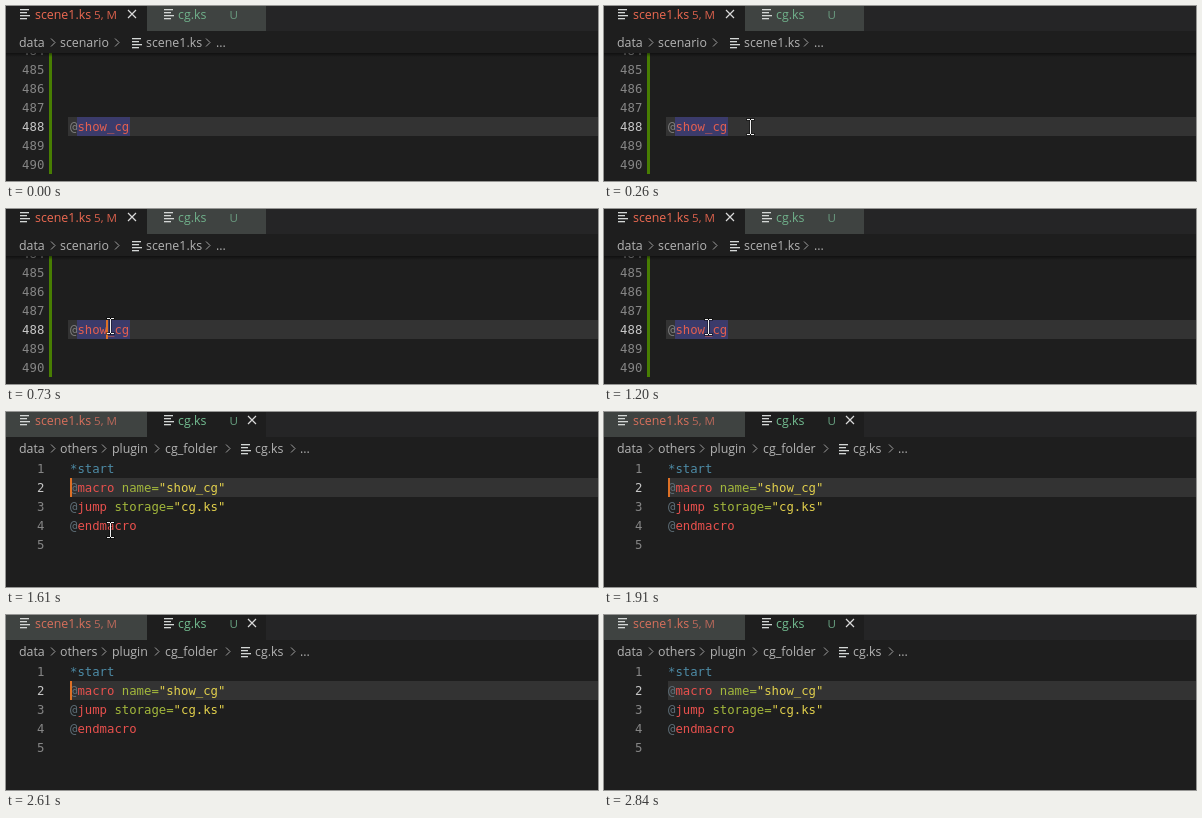
An HTML page with a canvas that plays this animation: 592x175 px, repeating every 2930 ms.

```html
<!DOCTYPE html>
<html lang="en">
<head>
<meta charset="utf-8">
<title>Jump to macro definition</title>
<style>
html, body { margin: 0; width: 100%; height: 100%; overflow: hidden; background: #1e1e1e; }
canvas { display: block; width: 592px; height: 175px; }
</style>
</head>
<body>
<canvas id="stage" width="592" height="175"></canvas>
<script>
const ctx = document.getElementById('stage').getContext('2d');
const LOOP = 2930, SWITCH = 1610;
const UI = '"Open Sans", "Noto Sans", sans-serif';
const CODE = '12.3px "DejaVu Sans Mono", monospace';
const CHAR = 7.4, ROW = 19, LEFT = 64;
const C = {
  bg: '#1e1e1e', bar: '#252526', tab: '#3f4341', line: '#333333', select: '#3b3b6b',
  num: '#858585', numOn: '#c6c6c6', crumb: '#b4b4b4', icon: '#d4d7d6', caret: '#dd7126',
  at: '#5f707a', red: '#e8504d', attr: '#a3b83c', str: '#e2d04c', label: '#4d8ba6'
};

// Pointer positions: time, x, y
const pointer = [
  [130, 236, 144], [195, 190, 132], [260, 146, 121], [330, 118, 114], [390, 106, 113],
  [530, 95, 113], [600, 104, 117], [1130, 104, 118]
];

function box(x, y, w, h, color) {
  ctx.fillStyle = color;
  ctx.fillRect(x, y, w, h);
}

function text(str, x, y, color, font, align = 'left') {
  ctx.font = font;
  ctx.fillStyle = color;
  ctx.textAlign = align;
  ctx.fillText(str, x, y);
}

function label(str, x, y, color, size = 12.4) {
  text(str, x, y, color, size + 'px ' + UI);
}

function strokes(points, color, width) {
  ctx.strokeStyle = color;
  ctx.lineWidth = width;
  ctx.beginPath();
  for (const [x1, y1, x2, y2] of points) {
    ctx.moveTo(x1, y1);
    ctx.lineTo(x2, y2);
  }
  ctx.stroke();
}

function fileIcon(x, y) {
  [9, 7, 10, 7].forEach((w, i) => box(x, y + i * 3, w, 1.3, C.icon));
}

function chevron(x) {
  strokes([[x - 2, 32.5, x + 2, 36.5], [x + 2, 36.5, x - 2, 40.5]], '#a0a0a0', 1);
}

function cross(x) {
  strokes([[x - 4, 4, x + 4, 12], [x + 4, 4, x - 4, 12]], '#dadada', 1.2);
}

function tabs(second) {
  box(0, 0, 592, 25, C.bar);
  box(0, 0, 141, 25, second ? C.tab : C.bg);
  box(141, 0, 119, 25, second ? C.bg : C.tab);
  fileIcon(14, 3);
  label('scene1.ks', 29, 13, second ? '#d8705c' : '#ee6a52');
  label('5, M', 88, 12.5, second ? '#b9685a' : '#d9604c', 11.6);
  fileIcon(158, 3);
  label('cg.ks', 172, 13, second ? '#73bd91' : '#70b18b');
  label('U', 223.5, 12.5, second ? '#69a382' : '#6b9c80', 11.6);
  cross(second ? 246 : 126);
}

function crumbs(parts, chevrons, iconX) {
  box(0, 25, 592, 22, C.bg);
  parts.forEach(([str, x]) => label(str, x, 41, C.crumb));
  chevrons.forEach(chevron);
  fileIcon(iconX, 32);
}

function number(n, y, on) {
  text(n, 38.3, y, on ? C.numOn : C.num, CODE, 'right');
}

function code(y, ...parts) {
  let x = LEFT;
  for (const [str, color] of parts) {
    text(str, x, y, color, CODE);
    x += str.length * CHAR;
  }
}

function scenario() {
  box(62, 111, 530, ROW, C.line);
  box(71, 111, 53, ROW, C.select);
  for (let i = 0; i < 7; i++) number(484 + i, 49 + i * ROW, i === 4);
  box(43, 47, 3, 121, '#487e02');
  code(125, ['@', '#808080'], ['show_cg', '#e35f50']);
  crumbs([['data', 13], ['scenario', 54], ['scene1.ks', 140], ['...', 210]], [47, 111, 202], 126);
  const shade = ctx.createLinearGradient(0, 47, 0, 51);
  shade.addColorStop(0, 'rgba(0,0,0,.45)');
  shade.addColorStop(1, 'rgba(0,0,0,0)');
  box(0, 47, 592, 4, shade);
}

function macro() {
  box(64, 66, 528, ROW, C.line);
  for (let i = 0; i < 5; i++) number(i + 1, 61 + i * ROW, i === 1);
  const at = ['@', C.at];
  code(61, ['*start', C.label]);
  code(80, at, ['macro ', C.red], ['name=', C.attr], ['"show_cg"', C.str]);
  code(99, at, ['jump ', C.red], ['storage=', C.attr], ['"cg.ks"', C.str]);
  code(118, at, ['endmacro', C.red]);
  crumbs([['data', 13], ['others', 54], ['plugin', 106], ['cg_folder', 159], ['cg.ks', 249], ['...', 294]],
    [47, 98, 151, 222, 287], 235);
}

function beam(x, y) {
  const parts = [[-3, -8, 3, 1], [1, -8, 3, 1], [0, -7, 1, 14], [-3, 7, 3, 1], [1, 7, 3, 1]];
  for (const [dx, dy, w, h] of parts) box(x + dx - 1, y + dy - 1, w + 2, h + 2, 'rgba(0,0,0,.4)');
  for (const [dx, dy, w, h] of parts) box(x + dx, y + dy, w, h, '#f0f0f0');
}

function within(t, from, to) {
  return t >= from && t < to;
}

function draw(t) {
  const second = t >= SWITCH;
  box(0, 0, 592, 175, C.bg);
  if (second) macro(); else scenario();
  tabs(second);

  if (within(t, 660, 1200)) box(100, 111, 2, ROW, C.caret);
  if (within(t, SWITCH, 2080) || within(t, 2610, 2840)) box(64, 66, 2, ROW, C.caret);

  if (within(t, 130, 1910)) {
    const [, x, y] = pointer.filter(p => p[0] <= t).pop();
    beam(x, y);
  }
}

const start = performance.now();
function tick() {
  draw((performance.now() - start) % LOOP);
  requestAnimationFrame(tick);
}
tick();
</script>
</body>
</html>
```
